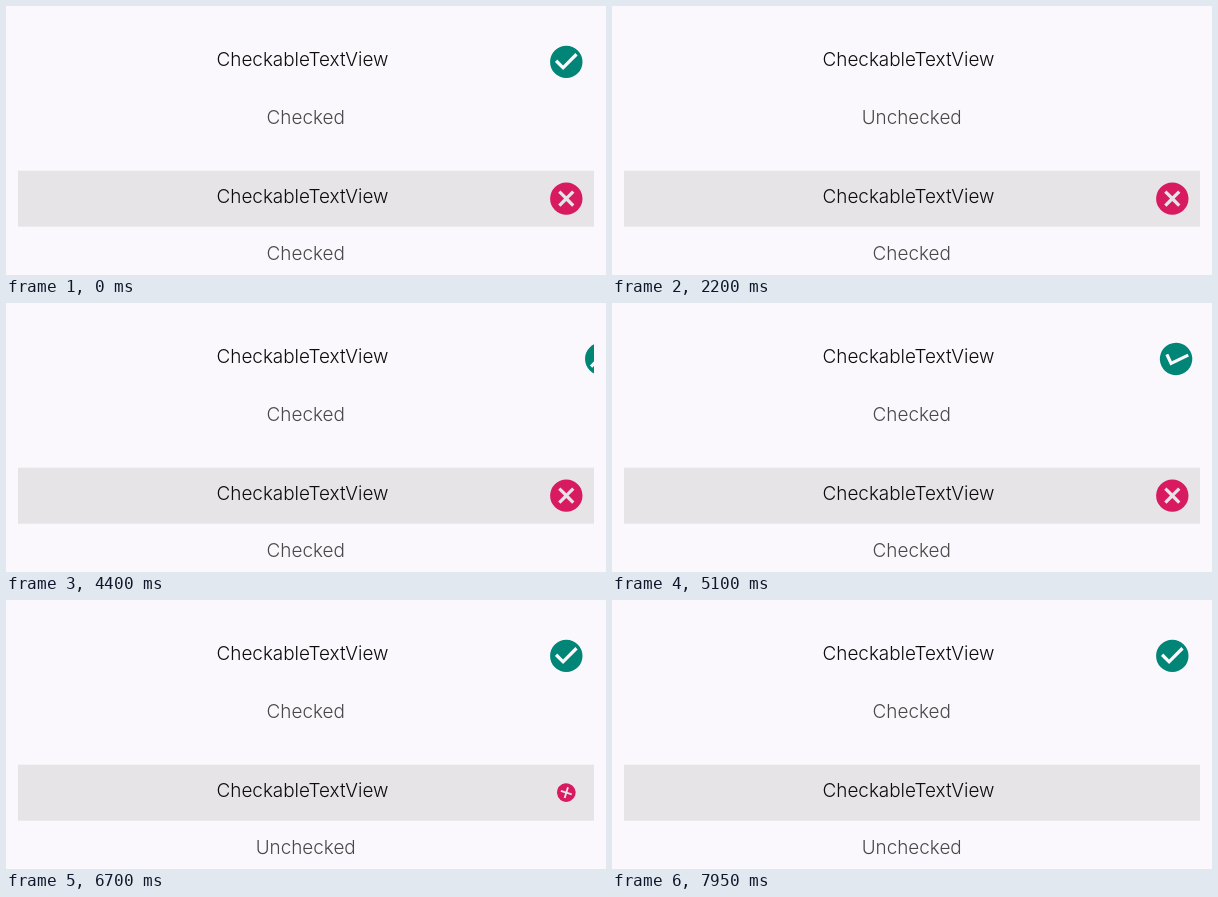
Animation, 600 px wide and 269 px high, one loop 8000 ms. Source, as an HTML page with a canvas:

```html
<!DOCTYPE html>
<html lang="en">
<head>
<meta charset="utf-8">
<title>Checkable rows</title>
<style>
  html, body { margin: 0; width: 100%; height: 100%; overflow: hidden; background: #faf8fc; }
  canvas, svg { position: absolute; left: 0; top: 0; width: 600px; height: 269px; }
  text { font: 300 18.9px Inter, "Open Sans", sans-serif; text-anchor: middle; fill: #484848; }
  .title { fill: #0c0c0c; }
</style>
</head>
<body>
<canvas id="stage"></canvas>
<svg viewBox="0 0 600 269">
  <text class="title" x="296.5" y="60.4">CheckableTextView</text>
  <text id="topStatus" x="299.7" y="117.6">Checked</text>
  <text class="title" x="296.5" y="197">CheckableTextView</text>
  <text id="bottomStatus" x="299.7" y="254.2">Checked</text>
</svg>
<script>
const LOOP = 8000, MOVE = 2000, SLIDE = 70;
const ROW = { x: 12, w: 576, h: 56 };
const TOP = 28, BOTTOM = 164.7, ICON_X = 560.3;

const canvas = document.getElementById('stage');
const ctx = canvas.getContext('2d');
const dpr = window.devicePixelRatio || 1;
canvas.width = 600 * dpr;
canvas.height = 269 * dpr;

const topStatus = document.getElementById('topStatus');
const bottomStatus = document.getElementById('bottomStatus');

// 24-unit icons, the marks are cut out of the disc
const DISC = 'M12 2a10 10 0 1 0 0 20a10 10 0 1 0 0-20z';
const check = new Path2D(DISC + 'M10 17l-5-5 1.41-1.41L10 14.17l7.59-7.59L19 8z');
const cross = new Path2D(DISC + 'M17 15.59L15.59 17 12 13.41 8.41 17 7 15.59 10.59 12 7 8.41 8.41 7 12 10.59 15.59 7 17 8.41 13.41 12z');

const clamp = v => Math.min(1, Math.max(0, v));
const ease = p => (1 - Math.cos(Math.PI * clamp(p))) / 2;

function clipRow(y) {
  ctx.beginPath();
  ctx.rect(ROW.x, y, ROW.w, ROW.h);
  ctx.clip();
}

function ripple(y, age) {
  if (age < 0 || age > 500) return;
  const grow = 1 - Math.pow(400, -1.4 * age / 350);
  const fade = 1 - clamp((age - 190) / 310);
  ctx.save();
  clipRow(y);
  ctx.fillStyle = `rgba(0,0,0,${0.125 * fade})`;
  ctx.beginPath();
  ctx.arc(160 + 140 * grow, y + ROW.h / 2, 289.4 * grow, 0, 7);
  ctx.fill();
  ctx.restore();
}

function icon(shape, color, y, dx, scale, turn) {
  if (scale < 0.01) return;
  ctx.save();
  clipRow(y);
  ctx.translate(ICON_X + dx, y + 27.9);
  ctx.rotate(turn * 2 * Math.PI);
  ctx.scale(1.62 * scale, 1.62 * scale);
  ctx.translate(-12, -12);
  ctx.fillStyle = color;
  ctx.fill(shape, 'evenodd');
  ctx.restore();
}

function setText(node, value) {
  if (node.textContent !== value) node.textContent = value;
}

function draw(t) {
  ctx.setTransform(dpr, 0, 0, dpr, 0, 0);
  ctx.fillStyle = '#faf8fc';
  ctx.fillRect(0, 0, 600, 269);
  ctx.fillStyle = '#e6e4e7';
  ctx.fillRect(ROW.x, BOTTOM, ROW.w, ROW.h);

  ripple(TOP, t - 690);
  ripple(TOP, t - 3240);
  ripple(BOTTOM, t - 5690);

  const away = ease((t - 750) / MOVE) - ease((t - 3400) / MOVE);
  icon(check, '#008577', TOP, SLIDE * away, 1, away);
  const gone = ease((t - 5800) / MOVE);
  icon(cross, '#d81b60', BOTTOM, 0, 1 - gone, gone);

  setText(topStatus, t >= 750 && t < 3400 ? 'Unchecked' : 'Checked');
  setText(bottomStatus, t >= 5800 ? 'Unchecked' : 'Checked');
}

const start = performance.now();
function tick() {
  draw((performance.now() - start) % LOOP);
  requestAnimationFrame(tick);
}
tick();
</script>
</body>
</html>
```
